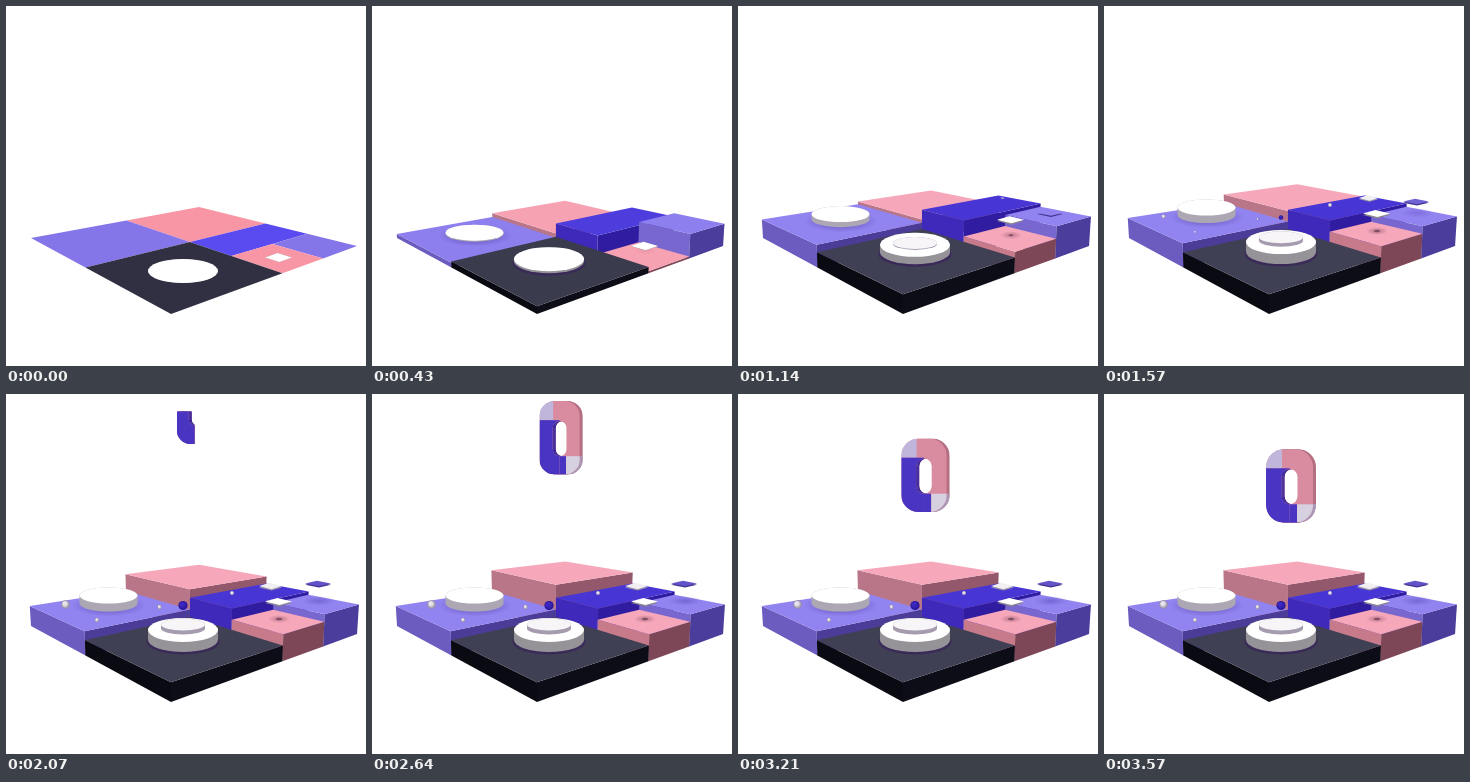
Write an HTML page with a canvas that moves like this. It is 360 by 360 pixels and loops after 4.07 s.

```html
<!DOCTYPE html>
<html lang="en">
<head>
<meta charset="utf-8">
<title>Rising blocks</title>
<style>
  html, body { margin: 0; width: 100%; height: 100%; overflow: hidden; background: #fff; }
  canvas { display: block; width: 100vw; height: 100vh; }
</style>
</head>
<body>
<canvas id="stage" width="360" height="360"></canvas>
<script>
const ctx = document.getElementById('stage').getContext('2d');
const LOOP = 4070, STEP = 3570 / 50;

const clamp = v => Math.max(0, Math.min(1, v));
const mix = (a, b, k) => a + (b - a) * k;
const smooth = p => p * p * (3 - 2 * p);
const linear = p => p;
const easeOut = p => 1 - (1 - p) ** 2;
const progress = (t, start, duration, ease = smooth) => ease(clamp((t - start) / duration));
const mixColor = (a, b, k) => `rgb(${a.map((v, i) => Math.round(mix(v, b[i], k))).join()})`;

// Perspective view of a unit floor: u runs left to back, v runs left to front.
function project(u, v, height = 0) {
  const depth = 1 + 0.3144 * u - 0.3638 * v;
  const x = (25 + 228.7 * u + 80 * v) / depth;
  const y = (232 + 32.2 * u - 36 * v - height) / depth;
  return [x + (x - 180) * height * 0.0004, y];
}

const PINK = [[249, 150, 166], [246, 168, 186]];
const PURPLE = [[132, 117, 233], [146, 132, 240]];
const blocks = {
  rear: { u: 0.5, v: 0, w: 0.5, d: 0.5, height: 44, top: PINK, left: '#b87688', right: '#94586c', start: 0, duration: 2300, ease: linear },
  blue: { u: 0.5, v: 0.5, w: 0.5, d: 0.25, height: 31.5, top: [[90, 75, 240], [72, 54, 212]], left: '#3f29ba', right: '#2f1ca0', start: 0, duration: 780 },
  violet: { u: 0, v: 0, w: 0.5, d: 0.5, height: 20, top: PURPLE, left: '#6c5cc0', right: '#4a3c97', start: 60, duration: 1290 },
  lilac: { u: 0.75, v: 0.75, w: 0.25, d: 0.25, height: 28, top: PURPLE, left: '#7767cf', right: '#4b3d9c', start: 0, duration: 630 },
  coral: { u: 0.5, v: 0.75, w: 0.25, d: 0.25, height: 21.5, top: PINK, left: '#c67a8a', right: '#7d4757', start: 208, duration: 1310 },
  black: { u: 0, v: 0.5, w: 0.5, d: 0.5, height: 12.6, top: [[48, 48, 66], [64, 64, 84]], left: '#0a0a13', right: '#0d0d18', start: 0, duration: 1000 }
};

function polygon(points, fill) {
  ctx.beginPath();
  points.forEach(([x, y]) => ctx.lineTo(x, y));
  ctx.closePath();
  ctx.fillStyle = fill;
  ctx.fill();
}

function ellipse(x, y, rx, ry, fill) {
  ctx.beginPath();
  ctx.ellipse(x, y, rx, ry, 0, 0, 2 * Math.PI);
  ctx.fillStyle = fill;
  ctx.fill();
}

function shadow(x, y, rx, ry, rgb, alpha) {
  ctx.save();
  ctx.translate(x, y);
  ctx.scale(1, ry / rx);
  const glow = ctx.createRadialGradient(0, 0, 0, 0, 0, rx);
  glow.addColorStop(0, `rgba(${rgb},${alpha})`);
  glow.addColorStop(1, `rgba(${rgb},0)`);
  ellipse(0, 0, rx, rx, glow);
  ctx.restore();
}

function block(name, t) {
  const { u, v, w, d, height, top, left, right, start, duration, ease } = blocks[name];
  const rise = progress(t, start, duration, ease);
  const corners = h => [[u, v], [u + w, v], [u + w, v + d], [u, v + d]].map(([a, b]) => project(a, b, h));
  const floor = corners(0), roof = corners(height * rise);
  if (rise > 0) {
    polygon([roof[0], roof[3], floor[3], floor[0]], left);
    polygon([roof[3], roof[2], floor[2], floor[3]], right);
  }
  polygon(roof, mixColor(top[0], top[1], progress(t, 0, 700)));
}

function disc(x, y, rx, ry, height, top, side) {
  ctx.beginPath();
  ctx.ellipse(x, y, rx, ry, 0, Math.PI, 2 * Math.PI);
  ctx.ellipse(x, y + height, rx, ry, 0, 0, Math.PI);
  ctx.closePath();
  ctx.fillStyle = side;
  ctx.fill();
  ellipse(x, y, rx, ry, top);
}

function tile(x, y, w, h, top, edge, thickness) {
  const shape = dy => [[x - w, y + dy], [x - 1, y - h + dy], [x + w, y + dy], [x + 1, y + h + dy]];
  polygon(shape(thickness), edge);
  polygon(shape(0), top);
}

function ball(x, y, radius, light, dark) {
  const shade = ctx.createRadialGradient(x - radius * 0.3, y - radius * 0.4, 0, x, y, radius);
  shade.addColorStop(0.4, light);
  shade.addColorStop(1, dark);
  ellipse(x, y, radius, radius, shade);
}

function ringLayer(x, y, w, h, pink, blue, white, white2 = white) {
  const panel = (x0, y0, x1, y1, color) => {
    ctx.fillStyle = color;
    ctx.fillRect(x + w * x0, y + h * y0, w * (x1 - x0), h * (y1 - y0));
  };
  ctx.save();
  ctx.beginPath();
  ctx.roundRect(x, y, w, h, w * 0.38);
  ctx.roundRect(x + w * 0.33, y + h * 0.27, w * 0.34, h * 0.48, w * 0.17);
  ctx.clip('evenodd');
  panel(0, 0, 1, 1, pink);
  panel(0, 0, 0.34, 0.26, white);
  panel(0, 0.26, 0.5, 1, blue);
  panel(0.5, 0.75, 0.66, 1, blue);
  panel(0.66, 0.75, 1, 1, white2);
  ctx.restore();
}

// The ring is uncovered from its lower left corner while it sinks and turns to face us.
function ring(t) {
  const shown = progress(t, 1850, 500, linear);
  if (!shown) return;
  const fall = progress(t, 1900, 1700);
  const h = 73.5, w = mix(36, 47, fall);
  const x = mix(189, 185.5, fall) - w / 2, y = mix(11, 92, fall) - h / 2;
  ctx.save();
  ctx.beginPath();
  ctx.rect(x, y + h * (1 - shown), (w + 4) * shown, h * shown);
  ctx.clip();
  for (let depth = 3; depth > 0; depth--) {
    ringLayer(x + depth, y, w, h, '#b56f82', '#32209f', '#a9a0c0');
  }
  ringLayer(x, y, w, h, '#d98c9f', '#4a35c2', '#c0b6dc', '#d6d0e0');
  ctx.restore();
}

function floatingTiles(t) {
  const white = progress(t, 114, 1200, linear);
  const shade = progress(t, 208, 1310);
  const shadowY = mix(246, 225, shade);
  shadow(273, shadowY, 11, 4, '90,35,60', 0.4 * white);
  ellipse(273, shadowY, 3 * shade, 1.3 * shade, 'rgba(85,50,72,.6)');
  tile(272.5, mix(251.5, 207.5, white), 13.5, mix(4.5, 3.4, white), '#fff', '#8d8592', 1.5 * white);

  const violet = progress(t, 1050, 850);
  shadow(313, 207, 17, 5, '75,58,175', 0.4 * violet);
  if (violet) tile(312, mix(207.5, 189.5, violet), 13, 2.8, mixColor(PURPLE[1], [98, 83, 200], violet), '#40338f', 1.2);

  const pale = progress(t, 900, 900);
  tile(264.5, 192, 11.5 * pale, 3.2 * pale, '#f2eff2', '#9a93a8', 1.4 * pale);
  ball(226, 199, 2 * progress(t, 1050, 600), '#eeeaf0', '#a39bb5');
}

function violetDisc(t) {
  const rise = progress(t, 107, 1290, linear);
  if (!rise) return;
  const y = mix(235, 201.5, rise);
  const height = 8 * progress(t, 250, 1400, linear);
  shadow(103, y + height + 2, 37, 11, '70,55,150', 0.7);
  disc(102.5, y, 29, 8, height, '#fff', '#aca7b3');
}

function blackDisc(t) {
  const y = mix(265, 236, progress(t, 66, 1570, easeOut));
  const height = 10 * progress(t, 150, 1350, linear);
  if (height) ellipse(177, y + height + 2, 36.5, 12.5, '#3a2a58');
  disc(177, y, 35, 12, height, '#fff', '#959298');
  const inner = progress(t, 850, 950);
  if (inner) disc(177, mix(y, 230.5, inner), 22, 6, 4 * inner, '#f8f5f8', '#a59cb0');
}

function draw(t) {
  ctx.fillStyle = '#fff';
  ctx.fillRect(0, 0, 360, 360);

  ['rear', 'blue', 'violet'].forEach(name => block(name, t));
  violetDisc(t);
  const grow = progress(t, 1150, 850);
  [[59.5, 210.5, 4.3], [91, 226, 2.2], [153.5, 213, 2.2]].forEach(([x, y, r]) => ball(x, y, r * grow, '#e8e5ec', '#8c849c'));
  ball(177, 211.5, 4.6 * grow, '#3c27c0', '#241391');

  ['lilac', 'coral', 'black'].forEach(name => block(name, t));
  blackDisc(t);
  floatingTiles(t);
  ring(t);
}

function play(now) {
  const index = Math.min(50, Math.floor((now % LOOP + 5) / STEP));
  draw(index * STEP);
  requestAnimationFrame(play);
}

draw(0);
requestAnimationFrame(play);
</script>
</body>
</html>
```
